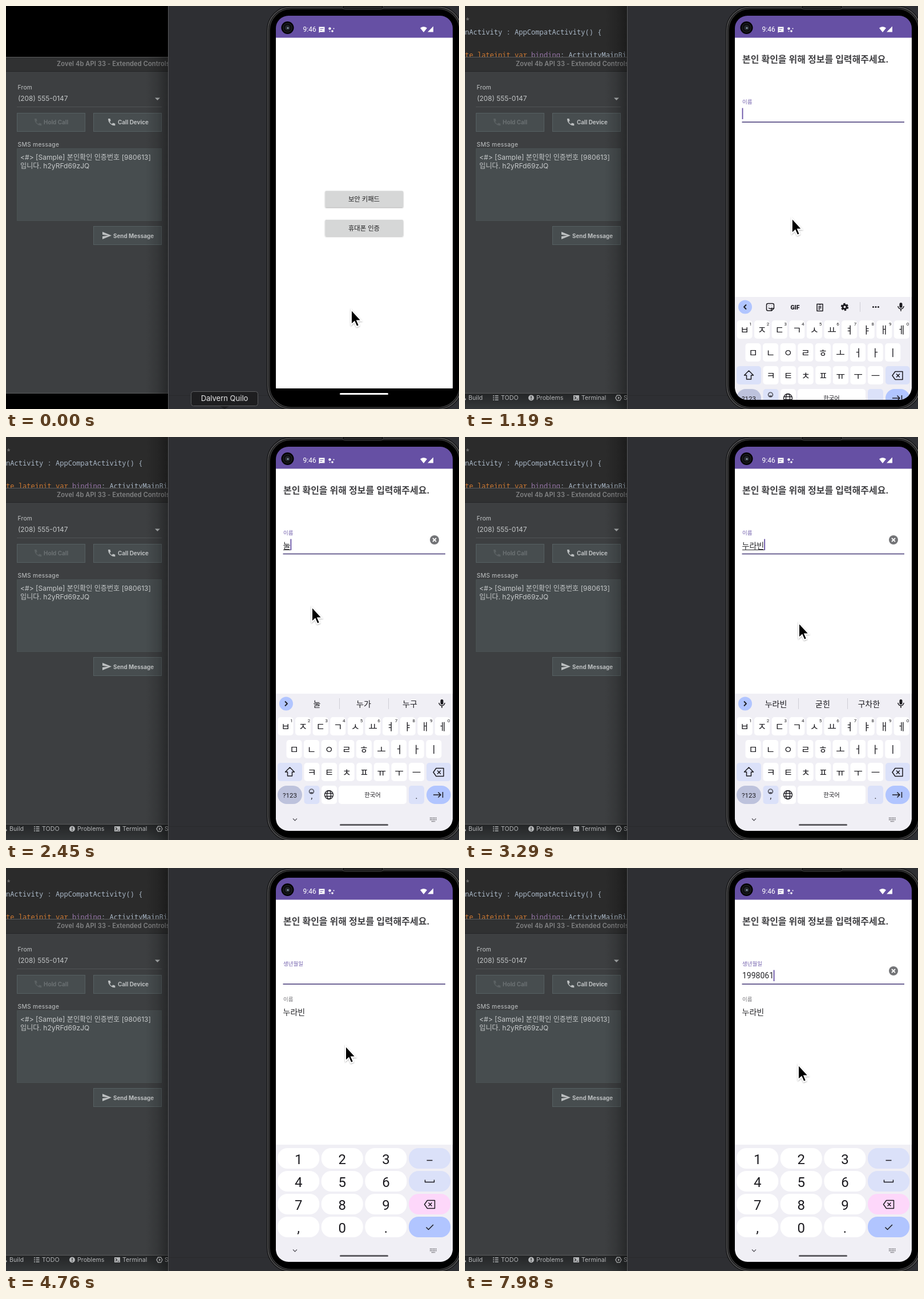
An HTML page that plays this animation: 794 px wide and 705 px high, repeating every 8000 ms.

```html
<!DOCTYPE html>
<html lang="ko">
<head>
<meta charset="utf-8">
<title>본인 확인</title>
<style>
html, body { margin: 0; width: 100%; height: 100%; overflow: hidden; background: #000; }
svg { display: block; width: 794px; height: 705px; }
text { font-family: Inter, "Noto Sans CJK KR", "Noto Sans CJK", sans-serif; white-space: pre; }
.app text { font-family: Roboto, "Noto Sans CJK KR", "Noto Sans CJK", sans-serif; }
.mid text, text.mid { text-anchor: middle; }
.code text { font: 12.1px "Noto Sans Mono", monospace; fill: #a9b7c6; }
.tools text { font-size: 10.7px; fill: #b3b5b7; }
.box { fill: #474d4f; stroke: #566062; }
.strong { font-size: 9.9px; font-weight: 700; fill: #bcbfc0; }
.ink { fill: none; stroke: #1c1b20; stroke-width: 1.5; stroke-linejoin: round; }
.label { font-size: 9.5px; }
.value { font-size: 14px; fill: #27272a; }
</style>
</head>
<body>
<svg viewBox="0 0 794 705">
  <defs>
    <linearGradient id="shade"><stop offset="0" stop-opacity="0"/><stop offset=".5" stop-opacity=".13"/><stop offset="1" stop-opacity=".36"/></linearGradient>
    <linearGradient id="under" x2="0" y2="1"><stop offset="0" stop-opacity=".4"/><stop offset="1" stop-opacity=".12"/></linearGradient>
    <clipPath id="screen"><rect x="473" y="17" width="310" height="672" rx="22"/></clipPath>
    <clipPath id="left"><rect width="285" height="705"/></clipPath>
    <filter id="soft" x="-50%" y="-50%" width="200%" height="200%"><feDropShadow dx="0" dy="1" stdDeviation="1.1" flood-opacity=".35"/></filter>
    <g id="mic"><rect x="-2.5" y="-7" width="5" height="9" rx="2.5" fill="#1c1b20"/><path class="ink" d="M-5 -1a5 5 0 0 0 10 0M0 4v4"/></g>
    <g id="erase"><path class="ink" d="M-9 0l5-7h13v14h-13zM-2-3l6 6m0-6l-6 6"/></g>
    <path id="phone" d="M-6-6h3.5l1.2 4-2 1.6a9 9 0 0 0 4 4l1.6-2 4 1.2v3.5a12 12 0 0 1-12.3-12.3z"/>
  </defs>

  <g clip-path="url(#left)">
    <rect width="285" height="705"/>
    <g id="ide">
      <rect width="285" height="90" fill="#2b2b2b"/>
      <g class="code">
        <text x="1" y="30" style="fill:#808080">*</text>
        <text x="0" y="50">nActivity : AppCompatActivity() {</text>
        <text x="0" y="90"><tspan fill="#cc7832">te lateinit var </tspan><tspan fill="#9876aa">binding</tspan>: ActivityMainBi</text>
      </g>
      <rect y="678" width="285" height="27" fill="#3c3f41"/>
      <rect y="678" width="285" height="27" fill="url(#under)"/>
      <g class="tools">
        <path d="M-3 683l5 5-2 2-5-5z" fill="#b3b5b7"/>
        <text x="6" y="689">Build</text><text x="63" y="689">TODO</text><text x="125" y="689">Problems</text><text x="204" y="689">Terminal</text><text x="278" y="689">S</text>
        <path d="M49 682h2m1.500 0h6M49 685.500h2m1.500 0h6M49 689h2m1.500 0h6" stroke="#b3b5b7" stroke-width="1.500"/>
        <circle cx="116" cy="685.500" r="5" fill="#b3b5b7"/><path d="M116 682.500v3.500m0 1v1.500" stroke="#2c2d2e" stroke-width="1.500"/>
        <rect x="190" y="681" width="10" height="9" fill="#b3b5b7"/><path d="M192 683l2.500 2.500-2.500 2.500m3.500 0h3" fill="none" stroke="#2c2d2e" stroke-width="1.200"/>
        <path d="M266.500 681h5l2.500 4.500-2.500 4.500h-5l-2.500-4.500z" fill="none" stroke="#b3b5b7" stroke-width="1.500"/><path d="M268 683l3.500 2.500-3.500 2.500z" fill="#b3b5b7"/>
      </g>
    </g>
    <rect y="90" width="285" height="588" fill="#3d3f41"/>
    <rect y="90" width="285" height="25" fill="#303132"/>
    <path d="M0 89.500h285M0 677.500h285" stroke="#5b5c5d"/><path d="M0 114.500h285" stroke="#252627"/>
    <text x="89" y="105" font-size="11.100" font-weight="600" letter-spacing=".1" fill="#828384">Zovel 4b API 33 - Extended Controls</text>
    <g fill="#c3c6c7">
      <text x="20.500" y="146" font-size="10.300" letter-spacing=".2">From</text>
      <text x="21" y="165.500" font-size="11.900">(208) 555-0147</text>
      <text x="20.500" y="246" font-size="10.300" letter-spacing=".3">SMS message</text>
      <path d="M261 160.500h9l-4.500 4.500z" fill="#aeb1b2"/>
    </g>
    <path d="M19 176.500h254" stroke="#505355"/>
    <g class="box">
      <rect x="19.500" y="187.500" width="119" height="32"/><rect x="153.500" y="187.500" width="119" height="32"/>
      <rect x="19.500" y="249.500" width="253" height="126" stroke="#4a5253"/><rect x="153.500" y="385.500" width="119" height="32"/>
    </g>
    <use href="#phone" x="56" y="203" fill="#5b6163"/><use href="#phone" x="185" y="203" fill="#bcbfc0"/>
    <text class="strong" x="66" y="207" style="fill:#6b7173">Hold Call</text>
    <text class="strong" x="196" y="207">Call Device</text>
    <text class="strong" x="188" y="405.500">Send Message</text>
    <path d="M169 395l16 6.500-16 6.500v-5l10-1.500-10-1.500z" fill="#bcbfc0"/>
    <g font-size="12.100" fill="#c6c9ca"><text x="25" y="268.500">&lt;#&gt; [Sample] 본인확인 인증번호 [980613]</text><text x="25" y="283.500">입니다. h2yRFd69zJQ</text></g>
    <rect x="245" width="40" height="705" fill="url(#shade)"/>
  </g>

  <rect x="285" width="509" height="705" fill="#2e2f33"/>
  <path d="M284.500 0v705" stroke="#58595b"/>
  <path d="M285 681.500h175" stroke="#28292c"/>
  <g id="tip">
    <rect x="324.500" y="674.500" width="117" height="25" rx="4" fill="#1e1e20" stroke="#5c5d5f"/>
    <path d="M375 700l8 5 8-5z" fill="#1e1e20"/>
    <text class="mid" x="383" y="691" font-size="13" fill="#e8e8e9">Dalvern Quilo</text>
  </g>

  <g stroke-width="1.200">
    <rect x="457.500" y=".5" width="342" height="706" rx="42" fill="#1d1d1e" stroke="#151516"/>
    <rect x="459" y="2" width="339" height="703" rx="40.500" fill="none" stroke="#626263"/>
    <rect x="462" y="5" width="333" height="697" rx="37.500" fill="#000" stroke="#3c3c3d"/>
  </g>
  <rect x="589.500" y="-6" width="72" height="12" rx="5" fill="#161617" stroke="#444"/>
  <path d="M593 2.500h65" stroke="#3c3c3c" stroke-width="3" stroke-dasharray="1 1"/>

  <g class="app" clip-path="url(#screen)">
    <rect x="473" y="17" width="310" height="672"/>
    <rect x="473" y="55" width="310" height="614" fill="#fff"/>
    <g id="home" class="mid" font-size="11.400" fill="#1f1f20">
      <g filter="url(#soft)" fill="#d6d7d7"><rect x="559.500" y="323.500" width="136.500" height="28.500" rx="1.500"/><rect id="press" x="559.500" y="374" width="136.500" height="28.500" rx="1.500"/></g>
      <text x="627.500" y="342">보안 키패드</text><text x="627.500" y="392.500">휴대폰 인증</text>
    </g>
    <g id="form">
      <rect x="473" y="55" width="310" height="614" fill="#fff"/>
      <text x="486" y="99" font-size="16" font-weight="600" fill="#414144">본인 확인을 위해 정보를 입력해주세요.</text>
      <g id="nameField">
        <text id="nameLabel" class="label" x="486" y="171">이름</text>
        <text id="name" class="value" x="485.500" y="194.500"></text>
        <path id="compose" stroke="#27272a"/>
      </g>
      <g id="birthField">
        <text class="label" x="486" y="171" fill="#7563ae">생년월일</text>
        <text id="birth" class="value" x="486" y="193"></text>
      </g>
      <rect id="line" x="485.500" width="284.500" height="1.800" fill="#5f558a"/>
      <rect id="caret" y="178.500" width="1.800" height="19.500" fill="#6650a4"/>
      <g id="clear"><circle cx="751" cy="180" r="8" fill="#737477"/><path d="M748 177l6 6m0-6l-6 6" stroke="#fff" stroke-width="1.800"/></g>
    </g>
    <rect x="473" y="17" width="310" height="38.500" fill="#6650a4"/>
    <g fill="#fff">
      <text x="520.500" y="45" font-size="12">9:46</text>
      <path d="M548.500 36.500h10v9h-8l-2 1.500z"/><path d="M550.500 39.500h6m-6 3h4" stroke="#6650a4"/>
      <circle cx="567.500" cy="39.500" r="2.200"/><circle cx="572" cy="44" r="1.800"/><circle cx="574.500" cy="39.500" r="1"/><circle cx="567.500" cy="44.500" r=".8"/>
      <path d="M726 38.500q6-4.500 12 0l-6 7.500zM739 45.500h10v-10z"/>
    </g>
    <circle cx="493.500" cy="38" r="11"/><circle cx="493.500" cy="38" r="8" fill="#0c0d0f" stroke="#2b2c30"/><circle cx="493.500" cy="38" r="4.500" fill="#23262b"/><circle cx="494" cy="38.500" r="1.600" fill="#8797aa"/>

    <g id="keyboard">
      <rect id="keyBack" x="473" y="449" width="310" height="240" fill="#f0eff5"/>
      <g id="letters" class="mid" fill="#1c1b20">
        <circle cx="491" cy="466.500" r="12" fill="#b1c5ff"/>
        <path id="chevron" class="ink" style="stroke-width:1.800"/>
        <use href="#mic" x="764" y="466"/>
        <g id="toolbar">
          <g class="ink">
            <path d="M531 460.500h8q2.500 0 2.500 2.500v6l-4 4h-6.500q-2.500 0-2.500-2.500v-7.500q0-2.500 2.500-2.500zM532 468q3 3 6 0M532.500 464.500v.5m5-.5v.5M537 473v-4h4"/>
            <path d="M617 461.500h10v12h-10zM620 462h4M619.500 465.500h5m-5 2.500h5m-5 2.500h3"/>
            <circle cx="665.500" cy="466.500" r="3.500" stroke-width="3"/><circle cx="665.500" cy="466.500" r="5.500" stroke-width="2.500" stroke-dasharray="3.200 2.560"/>
          </g>
          <text x="578.500" y="470.500" font-size="10.500" font-weight="800">GIF</text>
          <path d="M692.500 458v17" stroke="#cfced6"/>
          <circle cx="715.500" cy="466.500" r="1.500"/><circle cx="720" cy="466.500" r="1.500"/><circle cx="724.500" cy="466.500" r="1.500"/>
        </g>
        <g id="guesses" font-size="14">
          <text id="guess0" x="545" y="472"></text><text id="guess1" x="627" y="472"></text><text id="guess2" x="708" y="472"></text>
          <path d="M584.500 457v19M670.500 457v19" stroke="#cfced6"/>
        </g>
        <g id="letterKeys"></g>
        <path class="ink" d="M497.500 578l8 8h-4v7h-8v-7h-4z"/><use href="#erase" x="758" y="586.500"/>
        <g class="ink" style="stroke-width:1.100"><circle cx="535.500" cy="620" r="4"/><path d="M533.500 621.500q2 2 4 0M534 618.500v.6m3-.6v.6"/></g>
        <g class="ink" style="stroke-width:1.300"><circle cx="566" cy="626" r="7.500"/><ellipse cx="566" cy="626" rx="3.500" ry="7.500"/><path d="M559 623.500h14m-14 5h14"/></g>
        <path class="ink" d="M749 626h13m-4.500-4.500l4.500 4.500-4.500 4.500M765.500 621v10"/>
      </g>
      <g id="digits" class="mid" fill="#1c1b20">
        <g id="digitKeys"></g>
        <path class="ink" d="M737.500 511.500h10M734.500 545.500v4h16v-4"/><use href="#erase" x="742.500" y="588.500"/>
        <path class="ink" d="M736.500 628.500l4 4 8.500-8.500"/>
      </g>
      <path class="ink" d="M503 667.500l3.500 3.500 3.500-3.500" style="stroke:#55545a;stroke-width:1.200"/>
      <path d="M743 666.500h12M743 669.500h12M746 672.500h6" stroke="#55545a" stroke-width="1.400" stroke-dasharray="1.500 1"/>
    </g>
    <rect id="pill" x="585" y="677" width="85" height="3" rx="1.500"/>
  </g>

  <g id="cursor"><path d="M0 0V26.500L5.800 21.200 9.600 29.800 14 27.900 10.300 19.400H17.800Z" stroke="#fff" stroke-width="2" filter="url(#soft)"/></g>
</svg>
<script>
const LOOP = 8000, TICK = 70;
const el = Object.fromEntries([...document.querySelectorAll('[id]')].map(n => [n.id, n]));

function key(x, y, w, h, fill, rx, label = '', size = 17, dy = 23) {
  return `<rect x="${x}" y="${y}" width="${w}" height="${h}" rx="${rx}" fill="${fill}"/>` +
    `<text x="${x + w / 2}" y="${y + dy}" font-size="${size}">${label}</text>`;
}

function buildKeys() {
  const pale = '#dbe1f9', blue = '#b1c5ff';
  const rows = [['ㅂㅈㄷㄱㅅㅛㅕㅑㅐㅔ', 476.5], ['ㅁㄴㅇㄹㅎㅗㅓㅏㅣ', 491.5], ['ㅋㅌㅊㅍㅠㅜㅡ', 522.5]];
  let html = '';
  rows.forEach(([letters, left], r) => [...letters].forEach((c, i) => {
    const x = left + i * 30.6, y = 490 + r * 40;
    html += key(x, y, 27, 32, '#fff', 5, c);
    if (!r) html += `<text x="${x + 24}" y="${y + 9}" font-size="8">${(i + 1) % 10}</text>`;
  }));
  html += key(476, 570, 43, 32, pale, 5) + key(737, 570, 42.5, 32, pale, 5) +
    key(476, 610, 43, 32, '#bdc2dc', 16, '?123', 11.5, 20.5) +
    key(522.5, 610, 27, 32, pale, 5, ',', 14, 23) + key(553, 610, 27, 32, '#fff', 5) +
    key(583, 610, 119, 32, '#fff', 5, '한국어', 10.3, 20) + key(706, 610, 27, 32, pale, 5, '.', 15, 23) +
    key(737, 610, 42.5, 32, blue, 16).replace('<rect', '<rect id="enter"');
  el.letterKeys.innerHTML = html;
  el.enter = document.getElementById('enter');

  const sides = [pale, pale, '#fdd7fa', blue];
  el.digitKeys.innerHTML = ['123', '456', '789', ',0.'].map((row, r) =>
    [...row, ''].map((c, i) => key(476.2 + i * 76.6, 490 + r * 40, 73, 36, i < 3 ? '#fff' : sides[r], 17, c, 24, 28)).join('')
  ).join('');
}

// Each step holds until the next one begins.
const nameSteps = [[0, ''], [2240, 'ㄴ'], [2310, '누'], [2450, '눌'], [2590, '누라'], [2800, '누랍'], [2870, '누라비'], [2940, '누라빈']];
const birthSteps = [[0, 0], [6720, 1], [6930, 2], [7070, 3], [7210, 4], [7350, 5], [7630, 6], [7980, 7]];
const guessSteps = [[0, ['', '']], [2240, ['나', '네']], [2310, ['누가', '누구']], [2590, ['누나', '굳은']], [2800, ['굳힌', '구차한']]];
const caretSteps = [[0, 0], [1190, 1], [1610, 0], [2170, 1], [3430, 0], [5180, 1], [5740, 0], [6230, 1]];
const path = [[70, 605, 531], [420, 654, 390], [910, 654, 390], [1400, 512, 357], [1470, 522, 300], [1680, 536, 297],
  [3080, 536, 297], [3290, 585, 325], [3500, 760, 628], [4130, 760, 628], [4620, 594, 258], [4760, 595, 311], [4900, 584, 344]];

const held = (steps, t) => steps.findLast(s => s[0] <= t)[1];
const ramp = (t, a, b) => Math.min(1, Math.max(0, (t - a) / (b - a)));
const ease = p => p * p * (3 - 2 * p);
const set = (node, attrs) => { for (const k in attrs) node.setAttribute(k, attrs[k]); };
const show = (node, amount) => set(node, { opacity: +amount });
const move = (node, x, y) => set(node, { transform: `translate(${x} ${y})` });

function cursorAt(t) {
  const i = path.findIndex(p => p[0] > t);
  if (i < 1) return (i ? path.at(-1) : path[0]).slice(1);
  const [a, b] = [path[i - 1], path[i]], p = ramp(t, a[0], b[0]);
  return [a[1] + (b[1] - a[1]) * p, a[2] + (b[2] - a[2]) * p];
}

function drawForm(t) {
  const name = held(nameSteps, t), composing = name && t < 3850, second = t >= 3920;
  const open = ease(ramp(t, 910, 1120)), reveal = ramp(t, 4200, 4480);
  show(el.form, open);
  move(el.form, 30 * (1 - open), 0);
  el.name.textContent = name;
  el.birth.textContent = '1998061'.slice(0, held(birthSteps, t));
  move(el.nameField, 0, 62 * ease(ramp(t, 3920, 4200)));
  set(el.nameLabel, { fill: second ? '#77767a' : '#7563ae' });
  show(el.birthField, reveal);
  set(el.line, { y: composing ? 203.6 : 202.2, opacity: second ? reveal : 1 });

  const width = (second ? el.birth : el.name).getComputedTextLength();
  set(el.compose, { d: composing ? `M486 197.500h${width}` : '' });
  set(el.caret, { x: 485.6 + width });
  show(el.caret, held(caretSteps, t));
  show(el.clear, second ? ramp(t, 6720, 6930) : composing ? ramp(t, 2170, 2380) : 0);
}

function drawKeyboard(t) {
  const numeric = t >= 4410, typing = t >= 2240, slide = 1 - ramp(t, 1050, 1330);
  move(el.keyboard, 0, 240 * slide * slide);
  set(el.keyBack, { y: numeric ? 484 : 449 });
  show(el.letters, !numeric);
  show(el.digits, numeric);
  show(el.toolbar, !typing);
  show(el.guesses, typing);
  set(el.chevron, { d: typing ? 'M489 462.500l4 4-4 4' : 'M493 462.500l-4 4 4 4' });
  [held(nameSteps, t), ...held(guessSteps, t)].forEach((word, i) => el['guess' + i].textContent = word);
  set(el.enter, { fill: t >= 3850 && t < 4060 ? '#94aaea' : '#b1c5ff' });
  set(el.pill, { fill: t < 1190 ? '#fff' : '#5f5e63', opacity: t < 1190 || t >= 1470 ? 1 : 0 });
}

function draw(time) {
  const t = Math.floor(time / TICK) * TICK;
  show(el.ide, ramp(t, 0, 420));
  show(el.tip, 1 - ramp(t, 0, 280));
  set(el.press, { fill: t >= 860 && t < 1120 ? '#c2c3c3' : '#d6d7d7' });
  drawForm(t);
  drawKeyboard(t);
  move(el.cursor, ...cursorAt(t));
}

buildKeys();
const start = performance.now();
function frame() {
  draw((performance.now() - start) % LOOP);
  requestAnimationFrame(frame);
}
frame();
</script>
</body>
</html>
```
